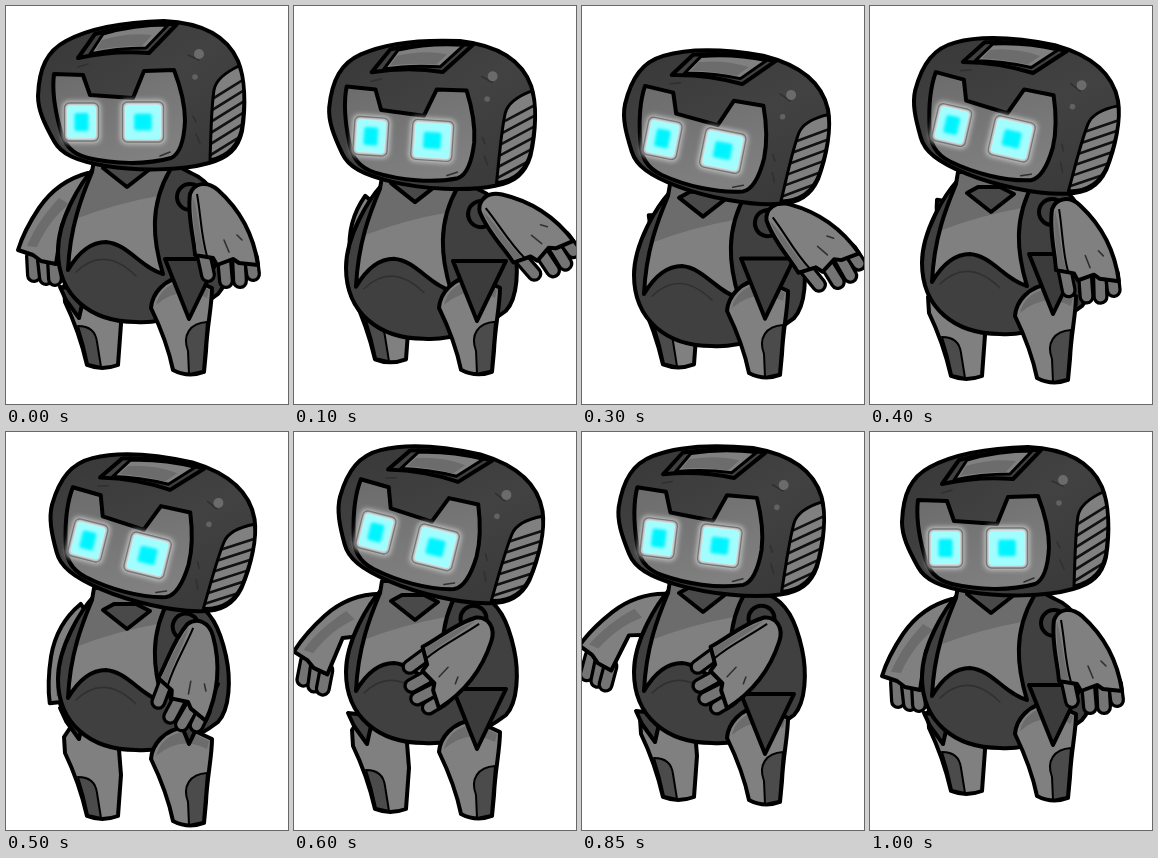
An HTML page that plays this animation: 282x398 px, repeating every 1.05 s.

```html
<!DOCTYPE html>
<html lang="en">
<head>
<meta charset="utf-8">
<title>Swinging robot</title>
<style>
  html, body { margin: 0; width: 100%; height: 100%; overflow: hidden; background: #fff; }
  svg { display: block; width: 282px; height: 398px; }
  .part { stroke: #000; stroke-width: 4; stroke-linejoin: round; stroke-linecap: round; }
  .trim { stroke: #000; stroke-width: 2; stroke-linejoin: round; }
  .slat { fill: none; stroke: #111; stroke-width: 2.6; }
  .scratch { fill: none; stroke: #303030; stroke-width: 1.6; stroke-linecap: round; }
  .dark { fill: #404040; }
  .light { fill: #808080; }
  .shade { fill: #6c6c6c; }
  .patch { fill: #4b4b4b; }
  .fingers path { fill: none; stroke-linecap: round; }
  .fingers .rim { stroke: #000; stroke-width: 16; }
  .fingers .skin { stroke: #747474; stroke-width: 9.5; }
</style>
</head>
<body>
<svg viewBox="0 0 282 398">
  <defs>
    <linearGradient id="shell" x1="0" y1="0" x2="1" y2="1">
      <stop offset="0" stop-color="#373737"/>
      <stop offset=".5" stop-color="#424242"/>
      <stop offset="1" stop-color="#373737"/>
    </linearGradient>
    <linearGradient id="visor" x1="0" y1="0" x2=".6" y2="1">
      <stop offset="0" stop-color="#6b6b6b"/>
      <stop offset="1" stop-color="#808080"/>
    </linearGradient>
    <filter id="glow" x="-50%" y="-50%" width="200%" height="200%">
      <feGaussianBlur stdDeviation="2.4"/>
    </filter>
    <filter id="soft" x="-50%" y="-50%" width="200%" height="200%">
      <feGaussianBlur stdDeviation="1.6"/>
    </filter>
    <clipPath id="chestClip">
      <path id="chestShape" d="M88 154L86 166C76 190 64 220 62 264C75 242 88 236 100 236C122 238 135 262 157 268C147 235 143 200 164 164L160 154Z"/>
    </clipPath>
    <clipPath id="ventClip">
      <path id="ventShape" d="M233 60C220 66 210 73 208 84C205 104 205 130 204 154C222 150 233 140 236 120C239 95 239 75 233 60Z"/>
    </clipPath>
  </defs>

  <g id="farArm">
    <g class="fingers" data-lines="M-58 65L-57 84M-47 69L-45 87M-37 69L-36 88"></g>
    <path class="part light" d="M-3 -18C-26 -12 -41 1 -52 17C-62 32 -69 46 -73 59L-58 64L-50 70L-35 73L-29 34L4 22Z"/>
    <path class="shade" d="M-32 7C-46 22 -57 38 -64 55L-54 56C-45 36 -35 24 -22 13Z"/>
  </g>

  <g id="farLeg">
    <path class="part light" d="M58 280L70 262L112 280L115 318L112 359Q96 365 81 359Q73 325 59 296Z"/>
    <path class="trim patch" d="M72 320Q89 320 91 336L95 361L82 358Q78 338 72 320Z"/>
  </g>
  <path id="farHip" class="part dark" d="M54 281L63 282L79 285L73 312L60 294Z"/>

  <g id="body">
    <path class="part dark" d="M90 154L88 162C75 176 52 213 52 245C52 290 85 316 130 316C160 318 190 305 212 288C224 275 225 245 220 222C214 195 205 175 185 167L160 154Z"/>
    <use href="#chestShape" class="light"/>
    <path clip-path="url(#chestClip)" class="shade" d="M60 150H170L152 190Q112 197 72 212Z"/>
    <path class="scratch" d="M70 266Q98 239 130 270"/>
    <use href="#chestShape" class="part" fill="none"/>
  </g>
  <path id="collar" class="part" fill="#494949" d="M97 162L121 181L144 163L130 156H108Z"/>

  <g id="nearLeg">
    <path class="part light" d="M145 302C146 288 158 272 180 270L206 282C206 300 201 320 200 345L198 366Q182 372 167 364Q161 335 145 302Z"/>
    <path class="shade" d="M150 299C153 285 164 276 182 274L203 284L201 292Q175 278 150 299Z"/>
    <path class="trim patch" d="M201 316C184 317 176 329 182 345L183 368L197 365Z"/>
  </g>
  <path id="nearHip" class="part" fill="#3b3b3b" d="M159 253H212L183 313Z"/>

  <g id="nearArm">
    <circle class="part dark" cx="-1" cy="-1" r="13"/>
    <g class="fingers" data-lines="M12 54L17 77M33 60L35 83M48 62L49 83M60 60L62 76"></g>
    <path class="part light" d="M-1 -4C3 -15 16 -18 27 -8C46 9 62 33 67 67L48 65L42 61L26 67L22 60L4 57C3 40 -4 18 -1 -4Z"/>
    <path class="shade" d="M2 -2C8 18 8 38 14 56L6 55C5 38 0 18 2 -2Z"/>
    <path class="trim" fill="none" d="M6 -4C10 18 10 38 16 58"/>
    <path class="scratch" d="M33 42L38 54M46 37L51 42"/>
  </g>

  <g id="head">
    <path class="part" fill="url(#shell)" d="M32 90C33 62 41 45 60 35C84 22 120 16 158 15C200 17 222 32 232 55C239 72 240 100 236 125C232 143 222 152 203 157C175 165 130 165 100 160C70 155 55 148 48 135C38 117 32 104 32 90Z"/>
    <path class="part dark" d="M72 52L89 28Q128 17 171 18L143 47Q108 44 72 52Z"/>
    <path class="part light" style="stroke-width:3" d="M84 48L97 28Q128 19 162 19L140 42Q110 42 84 48Z"/>
    <path class="shade" d="M90 44L96 34Q122 26 146 29L136 40Q110 40 90 44Z"/>
    <path class="part" fill="url(#visor)" d="M48 68L77 69L84 89L127 92L138 65L168 64C175 82 179 98 179 115C178 135 174 148 165 152C140 159 108 158 82 152C66 148 58 139 54 122C49 104 46 84 48 68Z"/>
    <path class="scratch" d="M154 150L164 146M182 49L193 54M190 128L194 137M72 61L82 58M187 110L190 116"/>
    <circle cx="193" cy="48" r="5" fill="#6b6b6b"/>
    <circle cx="189" cy="71" r="2.8" fill="#626262"/>
    <use href="#ventShape" fill="#808080"/>
    <path id="slats" class="slat" clip-path="url(#ventClip)"/>
    <use href="#ventShape" class="part" fill="none" style="stroke-width:3"/>
    <g id="eyes"></g>
  </g>
</svg>

<script>
const LOOP = 1050, STEP = 50, CYCLE = 1000;
const el = id => document.getElementById(id);

// Pose columns: time, head x, y, angle, body, collar, shoulder x, y, arm angle,
// far arm angle, near leg, far leg, near hip, far hip
const poses = [
  [0,   106.5, 116, 0,   0,  0,  0,  0,   0,   0,   0,  0,  0,  0],
  [200, 109.5, 145, 9,   30, 29, 5,  30, -42, -75,  1, -8,  4, -4],
  [400, 112,   126, 13,  12, 25, -2, 15,  1,  -70,  8,  11, -5, -10],
  [500, 112,   116, 14,  2,  16, -5, 4,   33, -25,  25, 25, -1, -5],
  [600, 112,   108, 14, -5,  7,  -6, -4,  66,  14,  18, 18, 4,  0],
  [750, 109.5, 107, 8.5, -8, -3, -9, -14, 104, 36,  8,  9,  16, -4],
  [850, 107.5, 110, 7,  -5, -1, -6, -4,  66,  18,  4,  6,  9,  -2]
];

function poseAt(i) {
  const n = poses.length, turn = Math.floor(i / n);
  const row = poses[i - turn * n].slice();
  row[0] += turn * CYCLE;
  return row;
}

// Smooth periodic curve through the poses
function sample(t) {
  let i = poses.length - 1;
  while (poses[i][0] > t) i--;
  const [p, a, b, q] = [-1, 0, 1, 2].map(k => poseAt(i + k));
  const span = b[0] - a[0], u = (t - a[0]) / span;
  return a.map((v, k) => {
    const m0 = (b[k] - p[k]) / (b[0] - p[0]) * span;
    const m1 = (q[k] - v) / (q[0] - a[0]) * span;
    const d = b[k] - v;
    return v + u * (m0 + u * (3 * d - 2 * m0 - m1 + u * (m0 + m1 - 2 * d)));
  });
}

function place(id, x, y, angle = 0, px = 0, py = 0) {
  el(id).setAttribute("transform",
    `translate(${x} ${y}) rotate(${angle}) translate(${-px} ${-py})`);
}

function draw(t) {
  const [, hx, hy, tilt, body, collar, sx, sy, arm, farArm,
    nearLeg, farLeg, nearHip, farHip] = sample(t);
  place("head", hx, hy, tilt, 106.5, 116);
  place("body", 0, body);
  place("collar", 0, collar);
  place("nearArm", 185 + sx, 192 + sy, arm);
  place("farArm", 85, 185 + body, farArm);
  place("nearLeg", 0, nearLeg);
  place("farLeg", 0, farLeg);
  place("nearHip", 0, nearHip);
  place("farHip", 0, farHip);
}

function eye(cx, cy, w, h) {
  const box = (pad, r, attrs) =>
    `<rect x="${cx - w / 2 - pad}" y="${cy - h / 2 - pad}" width="${w + 2 * pad}" height="${h + 2 * pad}" rx="${r}" ${attrs}/>`;
  return box(5, 6, 'fill="#c8c8c8" filter="url(#glow)"') +
    box(3, 5, 'fill="#a8a8a8" stroke="#6a6a6a" stroke-width="1.4"') +
    box(1, 3, 'fill="#e8ffff" filter="url(#soft)"') +
    box(0, 2, 'fill="#a2fdff"') +
    box(-w / 4, 2, 'fill="#00f4ff" filter="url(#soft)"');
}

el("eyes").innerHTML = eye(75.5, 116, 28, 32) + eye(137, 116, 35, 34);
el("slats").setAttribute("d",
  Array.from({ length: 7 }, (_, i) => `M203 ${95 + i * 11}L240 ${72 + i * 11}`).join(""));

for (const hand of document.querySelectorAll(".fingers")) {
  hand.innerHTML = hand.dataset.lines.split("M").slice(1)
    .map(d => `<path class="rim" d="M${d}"/><path class="skin" d="M${d}"/>`).join("");
}

const start = performance.now();
function tick() {
  const t = (performance.now() - start) % LOOP;
  draw(Math.floor(t / STEP) * STEP % CYCLE);
  requestAnimationFrame(tick);
}
tick();
</script>
</body>
</html>
```
